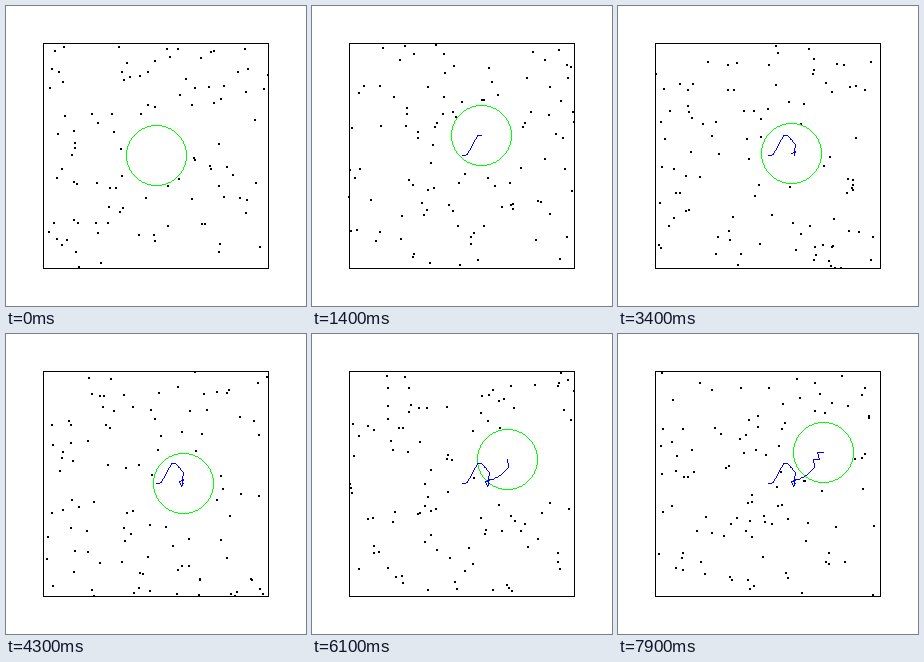
A matplotlib script for the animation above (8000 ms loop, 300 by 300 pixels).

```python
import matplotlib.pyplot as plt
import numpy as np
from matplotlib.animation import FuncAnimation
from matplotlib.patches import Rectangle

SIZE, DPI = 300, 100
PX = 72 / DPI              # one pixel in points
FRAMES, INTERVAL = 80, 100
LOW, HIGH = 37, 262        # walls of the box
RADIUS = 30
COUNT, SPEED, SUBSTEPS = 100, 3.5, 4

# Main kicks of the big particle: step, x, y
KICKS = [
    (0, 150, 150), (4, 155, 149), (11, 165, 130), (14, 169, 130),
    (19, 177, 139), (23, 176, 150), (29, 177, 146), (34, 173, 148),
    (39, 175, 153), (43, 177, 150), (45, 175, 148), (53, 188, 142),
    (58, 196, 134), (61, 195, 126), (67, 201, 126), (73, 199, 119),
    (79, 205, 119),
]


def ball_at(step):
    t, x, y = np.transpose(KICKS)
    return np.stack([np.interp(step, t, x), np.interp(step, t, y)], axis=-1)


def bounce_walls(pos, vel):
    vel[pos < LOW] = np.abs(vel[pos < LOW])
    vel[pos > HIGH] = -np.abs(vel[pos > HIGH])
    np.clip(pos, LOW, HIGH, out=pos)


def bounce_ball(pos, vel, center, drift):
    """Reflect the particles inside the ball in the ball's moving frame."""
    offset = pos - center
    dist = np.linalg.norm(offset, axis=1)
    hit = dist < RADIUS + 1
    normal = offset[hit] / dist[hit, None]
    inward = np.minimum(((vel[hit] - drift) * normal).sum(axis=1), 0)
    vel[hit] -= 2 * inward[:, None] * normal
    pos[hit] = center + normal * (RADIUS + 1)


def simulate(seed=11):
    rng = np.random.default_rng(seed)
    pos = rng.uniform(LOW, HIGH, (2 * COUNT, 2))
    free = np.linalg.norm(pos - ball_at(0), axis=1) > RADIUS + 2
    pos = pos[free][:COUNT]
    vel = rng.normal(0, SPEED, pos.shape)
    states = [pos.copy()]
    dt = 1 / SUBSTEPS
    for k in range(1, (FRAMES - 1) * SUBSTEPS + 1):
        center = ball_at(k * dt)
        drift = (center - ball_at((k - 1) * dt)) / dt
        pos += vel * dt
        bounce_walls(pos, vel)
        bounce_ball(pos, vel, center, drift)
        if k % SUBSTEPS == 0:
            states.append(pos.copy())
    return np.round(states)


def circle_pixels(radius):
    """One-pixel outline built from two mirrored arcs."""
    reach = round(radius / np.sqrt(2))
    u = np.arange(-reach, reach + 1)
    v = np.round(np.sqrt(radius**2 - u**2))
    return np.concatenate([np.stack(p, axis=1) for p in
                           ((u, v), (u, -v), (v, u), (-v, u))])


def line_pixels(a, b):
    n = int(np.abs(b - a).max())
    return np.round(np.linspace(a, b, n + 1))


ball_path = np.round(ball_at(np.arange(FRAMES)))
dust_path = simulate()
segments = [line_pixels(a, b) for a, b in zip(ball_path, ball_path[1:])]
ring = circle_pixels(RADIUS)

fig = plt.figure(figsize=(SIZE / DPI, SIZE / DPI), dpi=DPI, facecolor="white")
ax = fig.add_axes([0, 0, 1, 1])
ax.set(xlim=(0, SIZE), ylim=(SIZE, 0))
ax.axis("off")

side = HIGH - LOW
ax.add_patch(Rectangle((LOW, LOW), side, side, fill=False, edgecolor="black",
                       linewidth=PX, antialiased=False))
dust, = ax.plot([], [], "s", color="black", markersize=2 * PX,
                markeredgewidth=0, antialiased=False)
ball, = ax.plot([], [], ",", color="#00ff00")
trail, = ax.plot([], [], ",", color="#0000ff")


def draw(i):
    dust.set_data(*dust_path[i].T)
    ball.set_data(*(ball_path[i] + ring).T)
    trail.set_data(*(np.concatenate(segments[:i]).T if i else ([], [])))
    return dust, ball, trail


anim = FuncAnimation(fig, draw, frames=FRAMES, interval=INTERVAL,
                     repeat=True, repeat_delay=0)
plt.show()
```
